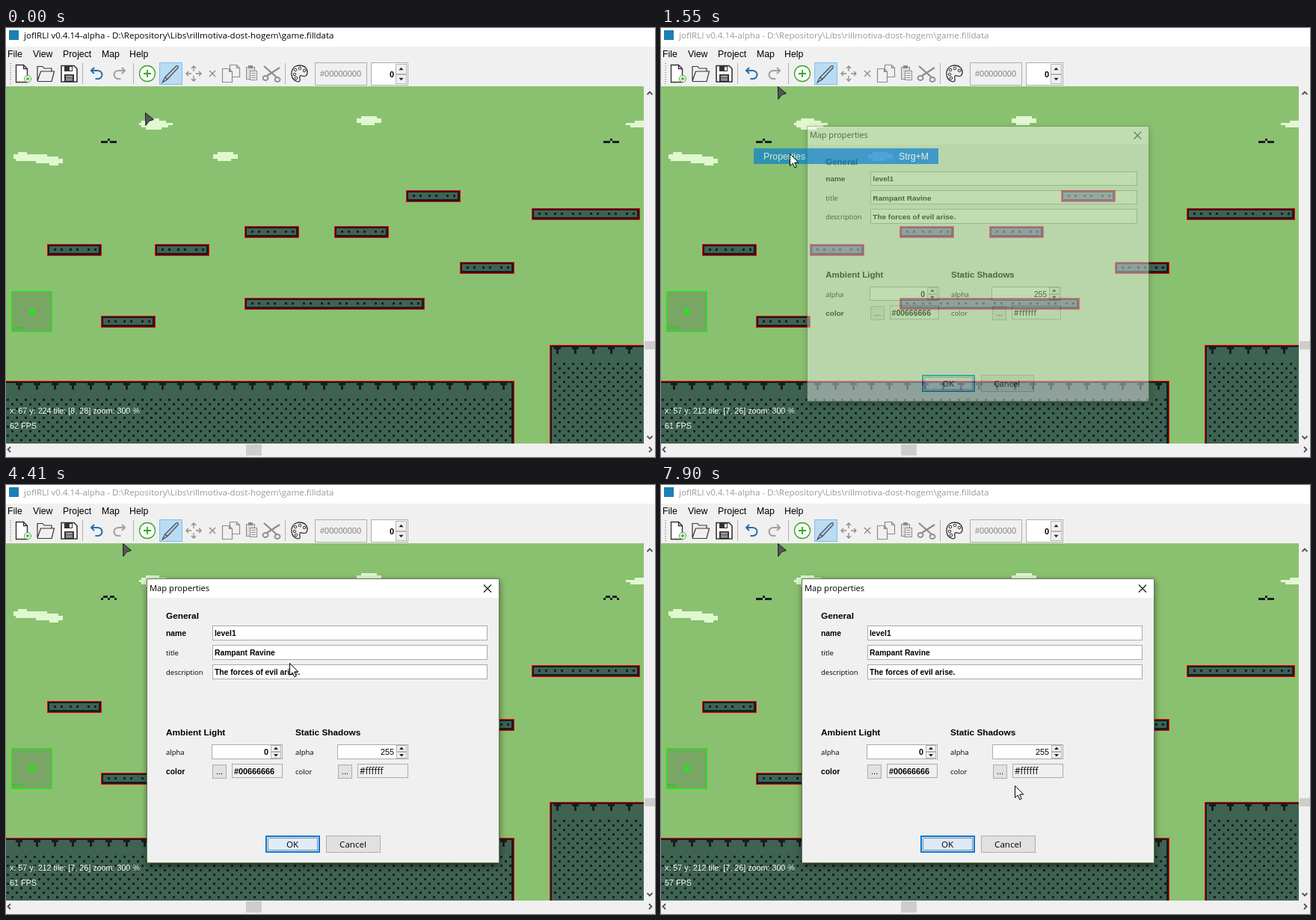
An HTML page for the animation above (8 s loop, 868 by 574 pixels).

```html
<!DOCTYPE html>
<html lang="en">
<head>
<meta charset="utf-8">
<title>Map editor</title>
<style>
html, body { margin: 0; width: 100%; height: 100%; overflow: hidden; background: #f0f0f0; }
svg { display: block; width: 868px; height: 574px; }
text { font: 12.3px "Liberation Sans", Arial, sans-serif; white-space: pre; }
rect { shape-rendering: crispEdges; }
</style>
</head>
<body>
<svg id="stage" viewBox="0 0 868 574" xmlns="http://www.w3.org/2000/svg"></svg>
<script>
const LOOP = 8000;
const DARK = '#181c24', TEAL = '#3e6351', GREEN = '#8ac170', CLOUD = '#e0f8d0', RED = '#f00';
const UI = '#f0f0f0', BLUE = '#0078d7';
const ARIAL = "'Liberation Sans',Arial,sans-serif";
const HUMAN = "'Open Sans','Noto Sans',sans-serif";

// ---- markup helpers ----
const rect = (x, y, w, h, fill, more = '') =>
  `<rect x="${x}" y="${y}" width="${w}" height="${h}" fill="${fill}" ${more}/>`;
const box = (x, y, w, h, fill, stroke) =>
  rect(x + .5, y + .5, w - 1, h - 1, fill, `stroke="${stroke}"`);
const path = (d, stroke, width = 1, fill = 'none', more = '') =>
  `<path d="${d}" stroke="${stroke}" stroke-width="${width}" fill="${fill}" ${more}/>`;
const text = (x, y, s, { size = 12.3, font = ARIAL, fill = '#000', bold, anchor = 'start', id = '' } = {}) =>
  `<text x="${x}" y="${y}" fill="${fill}" text-anchor="${anchor}" ${id && `id="${id}"`}
    style="font-family:${font};font-size:${size}px;font-weight:${bold ? 700 : 400}">${s}</text>`;
const group = (id, body, more = '') => `<g id="${id}" ${more}>${body}</g>`;
const range = n => [...Array(n).keys()];

// ---- game map ----
function platform([x, y, tiles]) {
  const w = tiles * 24;
  const dots = range(tiles).map(i => {
    const a = i === 0 ? 9 : 6;
    return [a, a + 9].map(o => rect(x + i * 24 + o, y + 6, 3, 3, DARK)).join('');
  }).join('');
  return rect(x, y, w, 15, DARK) + rect(x + 3, y + 3, w - 6, 9, TEAL) + dots +
    box(x, y, w + 1, 16, 'none', RED);
}

// edge: x of the dark side wall, rim: x of the red line beside it
function ground(x, y, w, firstTile, edge, rim) {
  const h = 556 - y, tiles = Math.floor((x + w - firstTile) / 24);
  const roots = range(tiles).map(i => {
    const tx = firstTile + i * 24;
    return rect(tx + 6, y + 3, 9, 3, DARK) + rect(tx + 9, y + 3, 3, 9, DARK);
  }).join('');
  return rect(x, y, w, h, TEAL) + rect(x, y + 24, w, h - 24, 'url(#dots)') + roots +
    rect(x, y, w, 3, DARK) + rect(edge, y, 3, h, DARK) +
    rect(x, y, w, 1, RED) + rect(rim, y, 1, h, RED);
}

// each row: x, y, width
const cloud = (dx, dy, rows) => rows.map(([x, y, w]) => rect(dx + x, dy + y, w, 3, CLOUD)).join('');
const PUFF = [[6, 0, 21], [0, 3, 33], [0, 6, 33], [6, 9, 18]];
const WIDE = [[9, 0, 18], [3, 3, 33], [0, 6, 45], [3, 9, 36], [9, 12, 21]];
const LONG = [[6, 0, 12], [0, 3, 45], [0, 6, 60], [3, 9, 63], [30, 12, 36], [48, 15, 12]];
const EDGE = [[12, 0, 12], [0, 3, 24], [6, 6, 18]];

const birdAt = x => [
  group('', rect(x + 9, 148, 3, 3, DARK) + rect(x, 151, 9, 3, DARK) + rect(x + 12, 151, 9, 3, DARK), 'class="flat"'),
  group('', rect(x + 3, 148, 6, 3, DARK) + rect(x + 12, 148, 6, 3, DARK) +
    [0, 9, 18].map(o => rect(x + o, 151, 3, 3, DARK)).join(''), 'class="flap"')
].join('');

function map() {
  const platforms = [[535, 217, 3], [703, 241, 6], [319, 265, 3], [439, 265, 3], [55, 289, 3],
    [199, 289, 3], [607, 313, 3], [319, 361, 10], [127, 385, 3]];
  const spawn = box(7, 352, 55, 55, 'rgba(84,102,74,.3)', '#0f0') + rect(32, 376, 6, 6, '#0f0') +
    text(9, 403, 'enter', { size: 6, fill: '#0d0' });
  const status = { size: 10.75, fill: '#fff' };
  return rect(0, 78, 853, 478, GREEN) +
    cloud(178, 121, WIDE) + cloud(469, 118, PUFF) + cloud(277, 166, PUFF) +
    cloud(10, 166, LONG) + cloud(829, 124, EDGE) +
    birdAt(127) + birdAt(799) + platforms.map(platform).join('') + spawn +
    ground(0, 472, 680, -17, 676, 679) + ground(727, 424, 126, 727, 727, 727) +
    text(5, 516, '', { ...status, id: 'pos' }) + text(5, 536, '', { ...status, id: 'fps' }) +
    group('pointer', path('M.5 .5L11.500 9.500L5.500 11.500L.8 17.500Z', '#1c1c20', 1, '#55555a'));
}

// ---- window frame ----
const arrowHead = (x, y, turn) =>
  path('M-3.5 2L0 -1.5L3.5 2', '#505050', 1.8, 'none', `transform="translate(${x} ${y}) rotate(${turn})"`);
const steps = (x, y, w, h) => [0, 1].map(i => {
  const top = y + i * h / 2, cx = x + w / 2, cy = top + h / 4, s = i ? 1 : -1;
  return box(x, top, w, h / 2, UI, '#b4b4b4') +
    path(`M${cx - 3} ${cy - 1.5 * s}h6l-3 ${3.5 * s}z`, 'none', 0, '#222');
}).join('');

function icons() {
  const ink = '#333', gray = '#8c8c8c', leaf = '#3aa52c';
  const sheet = 'M0 0h10l5 5v18h-15zM10 0v5h5';
  const move = (d, x, y, ...style) => path(d, ...style, `transform="translate(${x} ${y})"`);
  return range(10).map(i => rect(5, 47 + i * 3, 2, 1, '#a8a8a8')).join('') +
    move(sheet, 13.5, 49.5, ink, 1.4, '#fff') +
    `<circle cx="29" cy="68" r="4.5" fill="#fff" stroke="${leaf}"/>` + path('M26.500 68h5M29 65.500v5', leaf, 1.3) +
    path('M42 71V51.500h7l2 2.500h10v4M42 71l4.500-13h18l-3.500 13.500h-19', ink, 1.2) +
    path('M74 50.500h17l4 4v17.500h-21z', ink, 1.6, '#fff') + rect(78, 51, 11, 7, ink) +
    rect(85, 52, 3, 5, '#fff') + rect(78, 62, 13, 10, ink) + path('M80 64.500h9M80 67h9M80 69.500h9', '#fff', 1) +
    path('M118 53l-4 4 4 4M114.500 57h8a6 5.500 0 0 1 0 11h-3', '#2170b0', 2) +
    path('M155 53l4 4-4 4M158.500 57h-8a6 5.500 0 0 0 0 11h3', '#a0a0a0', 2) +
    `<circle cx="189" cy="61" r="10.500" fill="#f6fff4" stroke="${leaf}" stroke-width="1.3"/>` +
    path('M184 61h10M189 56v10', leaf, 1.8) +
    box(205, 46, 31, 30, '#b9dcf4', '#82bdea') +
    path('M209 73l3.500-7 15-15q2-1 2.500 0t0 2.500l-14 15zM212.500 66l3.500 2.500', '#444', 1.1, '#b0cfe4') +
    path('M251 51v7M251 64v7M241 61h7M254 61h7M248 54l3-3 3 3M248 68l3 3 3-3M244 58l-3 3 3 3M258 58l3 3-3 3', gray, 1.3) +
    path('M272 57l8 8M280 57l-8 8', gray, 1.4) +
    move('M0 0h9l4 4v12h-13zM9 0v4h4', 299.5, 49.5, gray, 1.2, UI) +
    move('M0 0h9l4 4v14h-13zM9 0v4h4', 289.5, 54.5, gray, 1.2, UI) +
    box(321, 52, 12, 17, '#dcdcdc', gray) + rect(324, 50, 6, 4, gray) + box(326, 57, 10, 13, UI, gray) +
    path('M328 60.500h6M328 63.500h6M328 66.500h6', gray) +
    path('M345 51l17 15M366 53l-17 11', gray, 2.2) +
    `<g fill="none" stroke="${gray}" stroke-width="1.800"><ellipse cx="347" cy="67" rx="3.500" ry="3"/><ellipse cx="363" cy="69" rx="3.500" ry="3"/></g>` +
    path('M392 50c8 0 11.500 5 11 10s-4 5-7 4-4 1-3 4-1 4.500-4 3.500c-6-2-8-8-7-13s5-8.500 10-8.500z', ink, 1.3) +
    [[387, 56], [393, 54], [399, 57], [386, 62], [388, 67]].map(([x, y]) =>
      `<circle cx="${x}" cy="${y}" r="1.800" fill="none" stroke="${ink}"/>`).join('') +
    [102, 170, 373].map(x => rect(x, 47, 1, 28, '#b0b0b0')).join('');
}

function chrome() {
  const title = 'jofIRLI v0.4.14-alpha - D:\\Repository\\Libs\\rillmotiva-dost-hogem\\game.filldata';
  const menus = [[2, 'File'], [36, 'View'], [76, 'Project'], [128, 'Map'], [165, 'Help']];
  return rect(0, 0, 868, 25, '#fff') + rect(0, 25, 868, 53, UI) +
    rect(4, 3, 13, 13, '#1c7fb5') + text(24, 14, title, { size: 11.55, font: HUMAN, id: 'title' }) +
    group('menuMark', rect(121, 25, 37, 19, BLUE)) +
    menus.map(([x, s]) => text(x, 39, s)).join('') + icons() +
    box(413, 46, 70, 31, UI, '#adadad') + text(420, 65, '#00000000', { size: 11, fill: '#808080' }) +
    box(488, 46, 50, 31, '#fff', '#adadad') + text(519, 66, '0', { size: 11, bold: true, anchor: 'end' }) +
    steps(521, 48, 15, 27) +
    rect(853, 78, 15, 496, UI) + rect(0, 556, 868, 18, UI) +
    rect(854, 419, 14, 11, '#cdcdcd') + rect(321, 557, 21, 15, '#cdcdcd') +
    arrowHead(861, 87, 0) + arrowHead(861, 548, 180) + arrowHead(4, 564, -90) + arrowHead(862, 564, 90);
}

// ---- popup menu ----
const ITEMS = [['Import...', 62], ['Export...', 83], ['Save map snapshot', 104, 'Strg+Eingabe'],
  ['Reassign Map IDs', 125], ['Remove current map', 146], ['Properties', 176, 'Strg+M']];
const itemRow = ([label, y, keys = ''], fill) =>
  text(137, y, label, { fill }) + text(358, y, keys, { fill, anchor: 'end' });
const litRow = item => rect(124, item[1] - 15, 247, 21, BLUE) + itemRow(item, '#fff');

const popup = () => group('popup',
  rect(125, 48, 252, 140, 'rgba(0,0,0,.45)', 'filter="url(#soft)"') + box(121, 44, 253, 141, UI, '#a0a0a0') +
  ITEMS.map(item => itemRow(item, '#000')).join('') + rect(125, 155, 245, 1, '#a0a0a0') +
  ITEMS.map((item, i) => group('lit' + i, litRow(item))).join(''));

// ---- dialog ----
const FIELDS = [['name', 188, 'level1', true], ['title', 214, 'Rampant Ravine'], ['description', 240, 'The forces of evil arise.']];

function dialog() {
  const plain = { size: 9.5, font: HUMAN }, strong = { size: 10.3, bold: true }, head = { size: 11.8, bold: true };
  const fields = FIELDS.map(([label, y, value, bold]) =>
    text(214, y + 14, label, bold ? strong : plain) + box(276, y, 368, 20, '#fff', '#ababab') +
    text(279, y + 14, value, strong)).join('');
  const light = (x, labelX, title, alpha, color, bold) =>
    text(labelX, 335, title, head) + text(labelX, 361, 'alpha', plain) +
    box(x, 347, 95, 20, '#fff', '#ababab') + steps(x + 79, 348, 14, 18) +
    text(x + 76, 361, alpha, { size: 10.8, bold, anchor: 'end' }) +
    text(labelX, 387, 'color', bold ? strong : plain) + box(x + 1, 374, 19, 19, '#e1e1e1', '#adadad') +
    text(x + 6, 387, '...', { size: 11 }) + box(x + 27, 373, 68, 19, UI, '#ababab') +
    text(x + 30, 387, color, bold ? { size: 10.8, bold } : { size: 11.8, font: HUMAN });
  const button = { size: 11.6, font: HUMAN, anchor: 'middle' };
  return group('dialog',
    rect(189, 128, 471, 382, 'rgba(0,0,0,.5)', 'filter="url(#wide)"') +
    box(188, 125, 472, 381, UI, '#66794f') + rect(189, 126, 470, 25, '#fff') +
    text(192, 142, 'Map properties', { size: 11.2, font: HUMAN }) +
    path('M639 133.500l10 10M649 133.500l-10 10', '#111', 1.1) +
    text(214, 179, 'General', head) + fields +
    light(275, 214, 'Ambient Light', '0', '#00666666', true) +
    light(443, 387, 'Static Shadows', '255', '#ffffff', false) +
    box(347, 469, 73, 23, BLUE, BLUE) + rect(349, 471, 69, 19, '#e5f1fb', 'id="ok"') +
    rect(350.5, 472.5, 66, 16, 'none', 'stroke="#333" stroke-dasharray="1 1"') +
    text(383, 485, 'OK', button) + box(428, 469, 73, 23, '#e1e1e1', '#adadad') + text(464, 485, 'Cancel', button));
}

const cursors = () =>
  group('arrow', path('M.5 .5V16.500L4.200 13L6.800 18.800L9.200 17.800L6.700 12H11.800Z', '#000', 1, '#fff')) +
  group('beam', path('M-3.500 -8h3M.500 -8h3M0 -7.500v15M-3.500 8h3M.500 8h3', '#000', 1.4));

const stage = document.getElementById('stage');
stage.innerHTML = `<defs>
  <pattern id="dots" x="7" y="4" width="12" height="12" patternUnits="userSpaceOnUse">
    ${rect(6, 0, 3, 3, DARK)}${rect(0, 6, 3, 3, DARK)}</pattern>
  <filter id="soft"><feGaussianBlur stdDeviation="1.500"/></filter>
  <filter id="wide"><feGaussianBlur stdDeviation="5"/></filter>
</defs>` + map() + chrome() + popup() + dialog() + group('ghost', litRow(ITEMS[5])) + cursors();

// ---- motion ----
const $ = id => document.getElementById(id);
const flats = stage.querySelectorAll('.flat'), flaps = stage.querySelectorAll('.flap');
const clamp = v => Math.min(1, Math.max(0, v));
const show = (el, on) => el.setAttribute('visibility', on ? 'visible' : 'hidden');
const place = (el, x, y) => el.setAttribute('transform', `translate(${Math.round(x)} ${Math.round(y)})`);

// time, x, y
const TRACK = [[0, 186, 113], [100, 186, 113], [330, 156, 78], [470, 143, 32], [610, 139, 20], [740, 138, 31],
  [850, 138, 31], [1350, 172, 168], [1550, 172, 168], [1700, 193, 171], [2090, 379, 238], [4450, 379, 238],
  [5050, 488, 222], [5600, 488, 222], [6050, 484, 300], [6900, 473, 402], [LOOP, 473, 402]];
const FPS = [[0, 62], [700, 61], [1750, 59], [2750, 61], [4750, 59], [5750, 60], [6750, 58], [7750, 57]];
const LEAVE = 330, OPEN = 690, PICK = 1455;

function mouse(t) {
  const i = TRACK.findIndex(k => k[0] > t);
  const [t0, x0, y0] = TRACK[i - 1], [t1, x1, y1] = TRACK[i];
  let u = (t - t0) / (t1 - t0);
  if (t1 - t0 > 250) u = u * u * (3 - 2 * u);
  return [x0 + (x1 - x0) * u, y0 + (y1 - y0) * u];
}

function draw(t) {
  const [mx, my] = mouse(t);

  const inMap = t < LEAVE;
  const [px, py] = inMap ? [mx, my] : [156, 78];
  const gx = Math.round(57 + (px - 156) / 3), gy = Math.round(212 + (py - 78) / 3);
  place($('pointer'), px, py);
  $('pos').textContent = `x: ${gx} y: ${gy} tile: [${gx >> 3}, ${gy >> 3}] zoom: 300 %`;
  $('fps').textContent = FPS.filter(k => k[0] <= t).pop()[1] + ' FPS';

  const phase = t % 800, up = phase >= 240 && phase < 640;
  flats.forEach(el => show(el, !up));
  flaps.forEach(el => show(el, up));

  const open = t >= OPEN && t < PICK;
  $('popup').style.display = open ? '' : 'none';
  show($('menuMark'), open);
  ITEMS.forEach((item, i) => show($('lit' + i), open && my >= item[1] - 15 && my < item[1] + 6));
  $('title').setAttribute('fill', t < PICK ? '#000' : '#999');

  const u = clamp((t - 1460) / 350), alpha = 1 - (1 - u) ** 2, scale = 1 - .055 * (1 - alpha);
  const win = $('dialog');
  win.setAttribute('opacity', alpha);
  win.setAttribute('transform', scale < 1 ? `translate(424 315.5) scale(${scale}) translate(-424 -315.5)` : '');
  $('ghost').setAttribute('opacity', t < PICK ? 0 : clamp(1 - (t - 1445) / 300));

  const glow = .5 - .5 * Math.cos(t * Math.PI / 1000);
  $('ok').setAttribute('fill', `rgb(${[221, 233, 245].map(c => Math.round(c + 7 * glow)).join()})`);

  const typing = u === 1 && mx > 276 && mx < 644 && FIELDS.some(f => my >= f[1] && my < f[1] + 20);
  show($('arrow'), !inMap && !typing);
  show($('beam'), typing);
  place($('arrow'), mx, my);
  place($('beam'), mx, my);
}

const start = performance.now();
function tick() {
  draw((performance.now() - start) % LOOP);
  requestAnimationFrame(tick);
}
tick();
</script>
</body>
</html>
```
